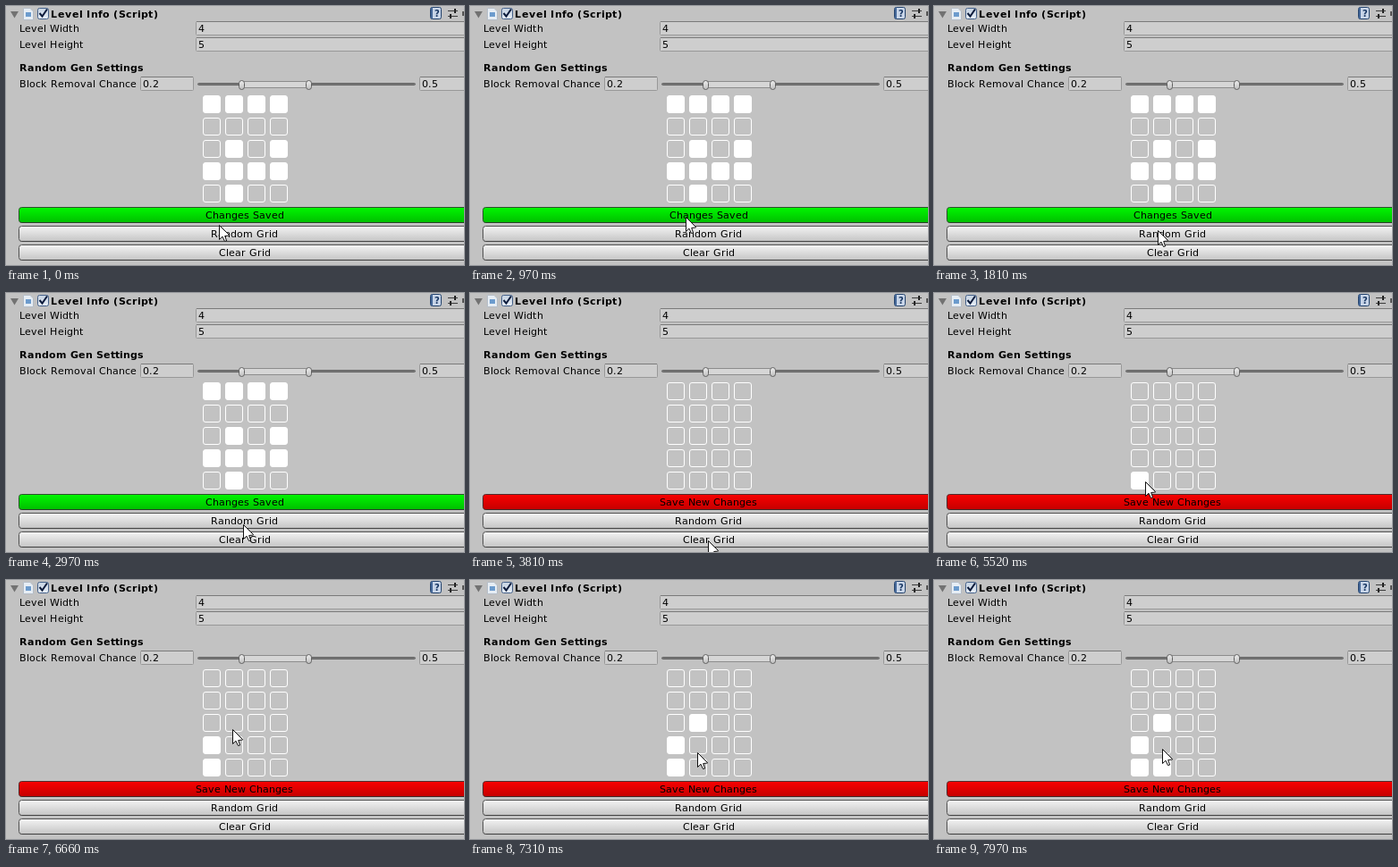
Write an HTML page with a canvas that moves like this. It is 512 px wide and 290 px high and loops after 8 s.

```html
<!DOCTYPE html>
<html lang="en">
<head>
<meta charset="utf-8">
<title>Level Info inspector</title>
<style>
html, body { margin: 0; width: 100%; height: 100%; overflow: hidden; background: #c2c2c2; }
canvas { display: block; width: 512px; height: 290px; }
</style>
</head>
<body>
<canvas id="stage" width="512" height="290"></canvas>
<script>
const ctx = document.getElementById('stage').getContext('2d');
const LOOP = 8000;
const CLEAR_AT = 3810;
const CELL = { x: 220, y: 100, step: 25, size: 20 };
const HOME = { x: 238, y: 245 };

// Pointer moves; it rests between them
const MOVES = [
  { from: 360, to: 1020, x: 241, y: 236 },
  { from: 1490, to: 1810, x: 250, y: 251 },
  { from: 2340, to: 2670, x: 262, y: 229 },
  { from: 2820, to: 3510, x: 266, y: 277 },
  { from: 4340, to: 4960, x: 236, y: 211 },
  { from: 5640, to: 5810, x: 237, y: 187 },
  { from: 6450, to: 6840, x: 254, y: 166 },
  { from: 7000, to: 7130, x: 254, y: 183 },
  { from: 7285, to: 7490, x: 254, y: 208 },
  { from: 7900, to: 7970, x: 255, y: 189 }
];

const easeOut = u => 1 - (1 - u) ** 4;

function pointerAt(t) {
  let { x, y } = HOME;
  for (const m of MOVES) {
    if (t <= m.from) break;
    const k = easeOut(Math.min(1, (t - m.from) / (m.to - m.from)));
    x += (m.x - x) * k;
    y += (m.y - y) * k;
  }
  return { x: Math.round(x), y: Math.round(y) };
}

// Each click fills the cell under the pointer
const clicks = [5520, 6240, 7020, 7670].map(at => {
  const p = pointerAt(at);
  return {
    at,
    col: Math.floor((p.x - CELL.x) / CELL.step),
    row: Math.floor((p.y - CELL.y) / CELL.step)
  };
});

function isOn(col, row, t) {
  if (t >= CLEAR_AT) return clicks.some(c => t >= c.at && c.col === col && c.row === row);
  return row % 3 === 0 || (row % 2 === 0 && col % 2 === 1 && row + col < 6);
}

function rect(x, y, w, h, fill) {
  ctx.fillStyle = fill;
  ctx.fillRect(x, y, w, h);
}

function paint(fill, line) {
  if (fill) { ctx.fillStyle = fill; ctx.fill(); }
  if (line) { ctx.strokeStyle = line; ctx.lineWidth = 1; ctx.stroke(); }
}

function roundBox(x, y, w, h, r, fill, line) {
  ctx.beginPath();
  ctx.roundRect(x + 0.5, y + 0.5, w - 1, h - 1, r);
  paint(fill, line);
}

function poly(points, fill, line) {
  ctx.beginPath();
  points.forEach(([x, y]) => ctx.lineTo(x, y));
  ctx.closePath();
  paint(fill, line);
}

function shade(y, h, top, bottom) {
  const g = ctx.createLinearGradient(0, y, 0, y + h);
  g.addColorStop(0, top);
  g.addColorStop(1, bottom);
  return g;
}

// Letters sit on whole pixels, as in a hinted interface font
function text(s, x, y, { bold = false, gap = 0.25, centered = false } = {}) {
  ctx.font = (bold ? 'bold ' : '') + '11px "DejaVu Sans", Verdana, sans-serif';
  ctx.textAlign = 'left';
  ctx.fillStyle = '#000';
  const advance = c => Math.round(ctx.measureText(c).width + gap);
  const chars = [...s];
  if (centered) x = Math.floor(x - chars.reduce((sum, c) => sum + advance(c), 0) / 2);
  for (const c of chars) {
    ctx.fillText(c, x, y);
    x += advance(c);
  }
}

function field(value, x, y, w) {
  roundBox(x, y, w, 16, 1, '#cecece', '#989898');
  rect(x + 1, y, w - 2, 1, '#7a7a7a');
  text(value, x + 3, y + 12);
}

function button(label, y, top, bottom, line) {
  roundBox(14, y, 508, 18, 3, shade(y, 18, top, bottom), line);
  rect(16, y + 17, 496, 1, 'rgba(0,0,0,0.2)');
  text(label, 267, y + 13, { centered: true });
}

function header() {
  poly([[5, 6], [14, 6], [9.5, 13.5]], '#727272');

  // Script page with a plain mark
  poly([[19.5, 2.5], [27, 2.5], [30.5, 6], [30.5, 15.5], [19.5, 15.5]], '#e6edf4', '#b4bcc6');
  rect(22, 7, 6, 5, '#6c9bcd');

  roundBox(35, 2, 13, 13, 2, shade(2, 13, '#c3d0e0', '#e9f0f8'), '#45618a');
  ctx.beginPath();
  ctx.moveTo(37.5, 8);
  ctx.lineTo(40.5, 11.5);
  ctx.lineTo(46, 3.5);
  ctx.strokeStyle = '#0c1c3c';
  ctx.lineWidth = 2;
  ctx.stroke();
  text('Level Info (Script)', 50, 13, { bold: true, gap: 0.5 });

  // Help, presets and menu
  roundBox(474, 1, 13, 14, 2, '#c8d5e8', '#23426c');
  rect(475, 2, 2, 12, '#46699a');
  ctx.font = 'bold 10px "DejaVu Sans", sans-serif';
  ctx.textAlign = 'center';
  ctx.fillStyle = '#1c3a66';
  ctx.fillText('?', 482, 12);
  for (let i = 0; i < 2; i++) {
    const y = 5 + i * 6;
    rect(494, y, 11, 1, '#3c3c3c');
    rect(501 - i * 5, y - 2, 2, 5, '#222');
  }
  rect(510, 6, 2, 5, '#555');
}

function slider() {
  roundBox(214, 86, 244, 3, 1, '#7c7c7c', '#626262');
  roundBox(263, 84, 75, 8, 2, '#d6d6d6', '#8c8c8c');
  for (const x of [260, 335]) {
    roundBox(x, 83, 7, 11, 3, shade(83, 11, '#f0f0f0', '#bcbcbc'), '#606060');
  }
}

function grid(t) {
  for (let row = 0; row < 5; row++) {
    for (let col = 0; col < 4; col++) {
      const x = CELL.x + col * CELL.step;
      const y = CELL.y + row * CELL.step;
      roundBox(x, y, CELL.size, CELL.size, 2.5, isOn(col, row, t) && '#fff', '#fff');
    }
  }
}

function pointer(t) {
  const { x, y } = pointerAt(t);
  ctx.save();
  ctx.translate(x, y);
  ctx.lineJoin = 'round';
  poly([[0.5, 0.5], [0.5, 16.5], [4, 13.2], [6.5, 18.5], [8.6, 18],
        [6.7, 12.5], [11.5, 12], [11.5, 11.5]], '#fff', '#111');
  ctx.restore();
}

function draw(t) {
  rect(0, 0, 512, 290, '#c2c2c2');
  header();
  text('Level Width', 15, 29);
  field('4', 212, 17, 310);
  text('Level Height', 15, 47);
  field('5', 212, 35, 310);
  text('Random Gen Settings', 15, 73, { bold: true, gap: 0.13 });
  text('Block Removal Chance', 15, 91);
  field('0.2', 150, 79, 60);
  slider();
  field('0.5', 462, 79, 60);
  grid(t);
  if (t < CLEAR_AT) button('Changes Saved', 225, '#00f800', '#00be00', '#2c502c');
  else button('Save New Changes', 225, '#fa0000', '#c40000', '#502c2c');
  button('Random Grid', 246, '#f5f5f5', '#c3c3c3', '#505050');
  button('Clear Grid', 267, '#f5f5f5', '#c3c3c3', '#505050');
  pointer(t);
}

function tick() {
  draw(performance.now() % LOOP);
  requestAnimationFrame(tick);
}
tick();
</script>
</body>
</html>
```
